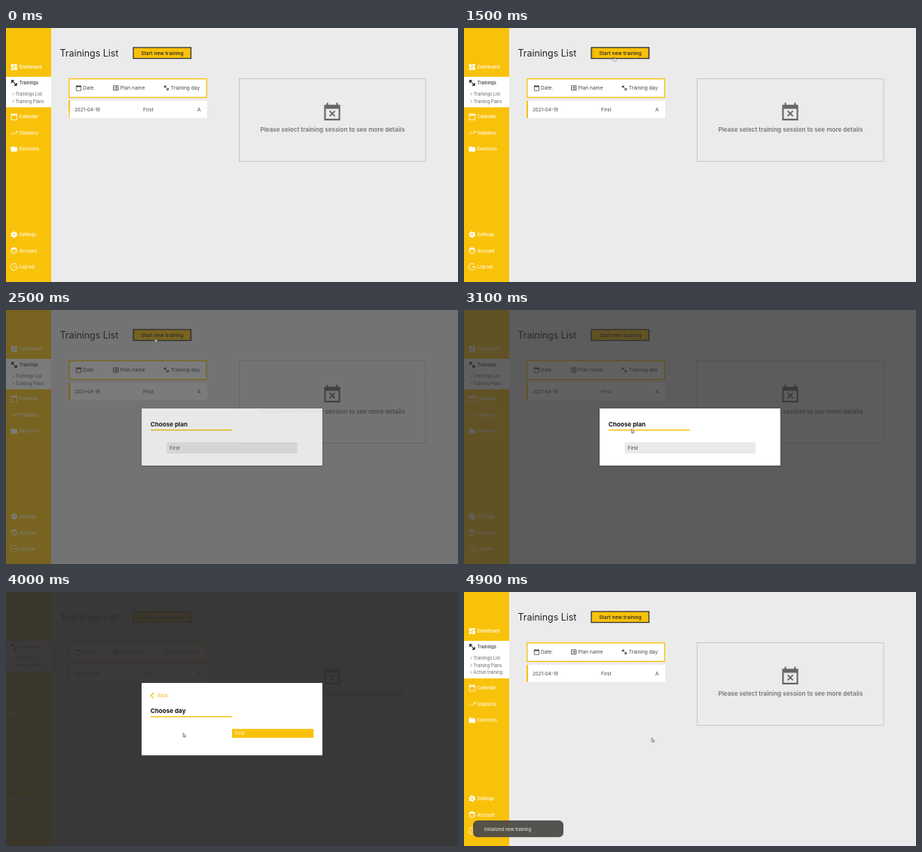
These frames come from a looping animation (600 by 338 pixels, 5000 ms). An HTML page:

```html
<!DOCTYPE html>
<html lang="en">
<head>
<meta charset="utf-8">
<title>Trainings List</title>
<style>
  html, body { margin: 0; width: 100%; height: 100%; overflow: hidden; background: #ecebec; }
  svg { display: block; width: 100vw; height: 100vh; }
  text { font-family: Inter, "Open Sans", sans-serif; font-size: 6.6px; fill: #444; }
  .nav text { font-size: 5.7px; font-weight: 500; fill: #fff; }
  .nav .on text { fill: #333; }
  .nav .sub text { font-weight: 400; fill: #666; }
  .title { font-size: 12.4px; fill: #222; }
  .btn { font-size: 6.7px; font-weight: 500; fill: #222; }
  .head { font-size: 8.1px; font-weight: 700; fill: #111; }
  .line { fill: none; stroke: currentColor; stroke-width: 2; }
  .solid { fill: currentColor; }
  .y { fill: #f9c20a; }

  .a { animation: 5s linear infinite both; }

  .fill { animation-name: fill; transform-origin: 83px 0; }
  @keyframes fill {
    0%, 13% { transform: scaleX(.011); }
    17% { transform: scaleX(.72); }
    18% { transform: scaleX(.489); }
    21%, 100% { transform: scaleX(.011); }
  }
  .gap { animation-name: gap; }
  @keyframes gap {
    0%, 13% { transform: translateX(83px); opacity: 0; }
    13.5% { opacity: 1; }
    17% { transform: translateX(215px); }
    18% { transform: translateX(172.5px); opacity: 1; }
    20.5% { opacity: 1; }
    21%, 100% { transform: translateX(83px); opacity: 0; }
  }
  .row text { animation-name: rowtext; }
  @keyframes rowtext {
    0%, 13% { fill: #444; }
    17% { fill: #bbb; }
    18% { fill: #999; }
    21%, 100% { fill: #444; }
  }

  .hover { animation-name: hover; transform-origin: 207.5px 33px; }
  @keyframes hover {
    0%, 29% { opacity: 0; transform: scaleX(.96); }
    36%, 45.5% { opacity: 1; transform: none; }
    51%, 100% { opacity: 0; transform: scaleX(.96); }
  }

  .dim1 { animation-name: dim1; }
  @keyframes dim1 {
    0%, 45% { opacity: 0; }
    51%, 97.7% { opacity: 1; }
    97.71%, 100% { opacity: 0; }
  }
  .dim2 { animation-name: dim2; }
  @keyframes dim2 {
    0%, 67% { opacity: 0; }
    74%, 93% { opacity: 1; }
    93.01%, 100% { opacity: 0; }
  }
  .plan { animation-name: plan; }
  @keyframes plan {
    0%, 45% { opacity: 0; }
    51%, 67% { opacity: 1; }
    71%, 100% { opacity: 0; }
  }
  .day { animation-name: day; }
  @keyframes day {
    0%, 67% { opacity: 0; }
    72%, 93% { opacity: 1; }
    93.01%, 100% { opacity: 0; }
  }
  .load { animation-name: load; }
  @keyframes load {
    0%, 93% { opacity: 0; }
    93.01%, 97.7% { opacity: 1; }
    97.71%, 100% { opacity: 0; }
  }

  .done { animation-name: done; }
  @keyframes done {
    0%, 97.7% { opacity: 0; }
    97.71%, 100% { opacity: 1; }
  }
  .shift { animation-name: shift; }
  @keyframes shift {
    0%, 97.7% { transform: none; }
    97.71%, 100% { transform: translateY(9.6px); }
  }

  .cursor { animation-name: move; }
  @keyframes move {
    0%, 7.5% { transform: translate(493px, 165px); opacity: 0; }
    7.51%, 8% { transform: translate(493px, 165px); opacity: 1; }
    10% { transform: translate(400px, 149px); }
    12% { transform: translate(298px, 131px); }
    14% { transform: translate(214px, 116px); }
    16% { transform: translate(164px, 103px); }
    18% { transform: translate(134px, 91.5px); }
    20% { transform: translate(137px, 84px); }
    24% { transform: translate(163px, 61px); }
    28% { transform: translate(192px, 41px); }
    30%, 53% { transform: translate(197.5px, 37.8px); }
    57% { transform: translate(206px, 85px); }
    62% { transform: translate(222px, 158px); }
    66% { transform: translate(226px, 182px); }
    74%, 77% { transform: translate(229.5px, 185px); }
    88%, 100% { transform: translate(248.8px, 193.7px); opacity: 1; }
  }
  .arrow { animation-name: arrow; }
  @keyframes arrow {
    0%, 28% { opacity: 1; }
    28.01%, 46% { opacity: 0; }
    46.01%, 65% { opacity: 1; }
    65.01%, 70% { opacity: 0; }
    70.01%, 87% { opacity: 1; }
    87.01%, 97.7% { opacity: 0; }
    97.71%, 100% { opacity: 1; }
  }
  .hand { animation-name: hand; }
  @keyframes hand {
    0%, 28% { opacity: 0; }
    28.01%, 46% { opacity: 1; }
    46.01%, 65% { opacity: 0; }
    65.01%, 70% { opacity: 1; }
    70.01%, 87% { opacity: 0; }
    87.01%, 97.7% { opacity: 1; }
    97.71%, 100% { opacity: 0; }
  }
</style>
</head>
<body>
<svg viewBox="0 0 600 338" preserveAspectRatio="none">
  <defs>
    <symbol id="board" viewBox="0 0 24 24"><path class="solid" d="M3 13h8V3H3zm0 8h8v-6H3zm10 0h8V11h-8zm0-18v6h8V3z"/></symbol>
    <symbol id="bell" viewBox="0 0 24 24">
      <g class="line" transform="rotate(45 12 12)" stroke-width="3"><path d="M0 12h24" stroke-width="2.6"/><path d="M4.5 6v12M19.5 6v12" stroke-width="3.4"/><path d="M1.2 9v6M22.8 9v6" stroke-width="2.4"/></g>
    </symbol>
    <symbol id="cal" viewBox="0 0 24 24"><path class="line" d="M3 4.500h18V22H3z"/><path class="solid" d="M3 4h18v4.500H3zM5 1h2v4H5zM17 1h2v4h-2z"/></symbol>
    <symbol id="trend" viewBox="0 0 24 24"><path class="line" d="M2.500 17.500l7-7 4 4 7-7"/><path class="solid" d="M16 6h6v6z"/></symbol>
    <symbol id="folder" viewBox="0 0 24 24"><path class="solid" d="M4 4h6l2 2h8q2 0 2 2v10q0 2-2 2H4q-2 0-2-2V6q0-2 2-2z"/></symbol>
    <symbol id="list" viewBox="0 0 24 24"><path class="line" d="M3 3.500h18v17H3zM6 8h2M10 8h8M6 12h2M10 12h8M6 16h2M10 16h8"/></symbol>
    <symbol id="gear" viewBox="0 0 24 24"><circle class="line" cx="12" cy="12" r="5.500" style="stroke-width:5"/><circle class="line" cx="12" cy="12" r="9" stroke-dasharray="4.700 4.725" style="stroke-width:3"/></symbol>
    <symbol id="face" viewBox="0 0 24 24"><circle class="line" cx="12" cy="12" r="9"/><path class="solid" d="M3 11q6 0 8-4 4 4 10 3Q19 2 12 2 4 3 3 11z"/><circle class="solid" cx="9" cy="14" r="1.400"/><circle class="solid" cx="15" cy="14" r="1.400"/></symbol>
    <symbol id="exit" viewBox="0 0 24 24"><path class="line" d="M19 5A10 10 0 1 0 22 12H11"/></symbol>
  </defs>

  <rect width="600" height="338" fill="#ecebec"/>

  <g class="nav" color="#fff">
    <rect class="y" width="60" height="338"/>
    <use href="#board" x="5.500" y="46.700" width="10.500" height="10.500"/><text x="17.800" y="54">Dashboard</text>
    <rect y="65" width="60" height="40.500" fill="#fff"/>
    <rect class="a done" y="105" width="60" height="10" fill="#fff"/>
    <g class="on" color="#222"><use href="#bell" x="6" y="68.300" width="9.600" height="9.600"/><text x="17.800" y="75.300">Trainings</text></g>
    <g class="sub" color="#777">
      <path d="M8.800 86.200l1.700 1.700-1.700 1.700M8.800 95.700l1.700 1.700-1.700 1.700" fill="none" stroke="#777" stroke-width=".7"/>
      <text x="12.500" y="90">Trainings List</text><text x="12.500" y="99.500">Training Plans</text>
      <g class="a done"><path d="M8.800 105.200l1.700 1.700-1.700 1.700" fill="none" stroke="#777" stroke-width=".7"/><text x="12.500" y="109">Active training</text></g>
    </g>
    <g class="a shift">
      <use href="#cal" x="5.800" y="113" width="10" height="10"/><text x="17.800" y="120.200">Calendar</text>
      <use href="#trend" x="5.800" y="134.500" width="10.500" height="10.500"/><text x="17.800" y="141.800">Statistics</text>
      <use href="#folder" x="5.600" y="156" width="10.200" height="10.200"/><text x="17.800" y="163.200">Exercises</text>
    </g>
    <use href="#gear" x="5.600" y="269.700" width="10.200" height="10.200"/><text x="17.800" y="277">Settings</text>
    <use href="#face" x="5.400" y="291" width="10.500" height="10.500"/><text x="17.800" y="298.500">Account</text>
    <use href="#exit" x="5.400" y="312.500" width="10.500" height="10.500"/><text x="17.800" y="319.900">Log out</text>
  </g>

  <text class="title" x="71.500" y="38">Trainings List</text>
  <rect class="y" x="169" y="26" width="76.500" height="14.500" stroke="#333" stroke-width="1.300"/>
  <g class="a hover">
    <rect x="166.800" y="25.300" width="81.400" height="16" fill="#333"/>
    <rect class="y" x="170.500" y="26.600" width="74.600" height="13.400"/>
    <path d="M168.700 26.500v13.500M246.700 26.500v13.500" stroke="#a8967a" stroke-width=".8" stroke-dasharray="1 1"/>
  </g>
  <text class="btn" x="207.500" y="35.900" text-anchor="middle">Start new training</text>

  <rect x="83.800" y="67.600" width="182.500" height="24.800" fill="#fff" stroke="#f9c20a" stroke-width="1.400"/>
  <g color="#333">
    <use href="#cal" x="92.200" y="75.600" width="8.400" height="8.400"/><text x="102" y="82.100">Date.</text>
    <use href="#list" x="141.500" y="75.500" width="8.600" height="8.600"/><text x="151.800" y="82.100">Plan name</text>
    <use href="#bell" x="209" y="75.900" width="7.800" height="7.800"/><text x="218.800" y="82.100">Training day</text>
  </g>
  <g class="row">
    <rect x="83" y="96.800" width="184" height="23" fill="#fff"/>
    <rect class="y a fill" x="83" y="96.800" width="184" height="23"/>
    <rect class="a gap" y="96.800" width="1.300" height="23" fill="#ecebec"/>
    <text class="a" x="91" y="110.500" style="font-size:6.200px">2021-04-19</text>
    <text class="a" x="182" y="110.500">First</text>
    <text class="a" x="254" y="110.500">A</text>
  </g>

  <rect x="309.500" y="67.500" width="247.500" height="110" fill="none" stroke="#999" stroke-width=".9" stroke-dasharray="1 1"/>
  <g color="#666">
    <use href="#cal" x="419.500" y="98.500" width="27" height="25.500"/>
    <path class="line" d="M429.600 110.400l7 7M436.600 110.400l-7 7" style="stroke-width:1.900"/>
  </g>
  <text x="433.400" y="138.400" text-anchor="middle" style="font-size:8.100px;font-weight:600;fill:#757575">Please select training session to see more details</text>

  <g class="a done">
    <rect x="12" y="304" width="120" height="22.300" rx="6" fill="#4d4b48" fill-opacity=".95"/>
    <text x="27" y="317.500" style="font-size:5.900px;fill:#eee">Initialized new training</text>
  </g>

  <rect class="a dim1" width="600" height="338" fill="rgba(46,45,45,.75)"/>
  <rect class="a dim2" width="600" height="338" fill="rgba(46,45,45,.75)"/>

  <g class="a plan">
    <rect x="179" y="130.500" width="242" height="78" fill="#000" opacity=".15"/>
    <rect x="180" y="131" width="240" height="76" fill="#fff"/>
    <text class="head" x="191.800" y="155.200">Choose plan</text>
    <rect class="y" x="192" y="159" width="108" height="1.500"/>
    <rect x="213.300" y="176" width="173.500" height="15" fill="#e9e9e9"/>
    <text x="217.300" y="186">First</text>
  </g>

  <g class="a day">
    <rect x="180" y="121" width="240" height="96.300" fill="#fff"/>
    <path d="M196 134l-3.500 3.700 3.500 3.700" fill="none" stroke="#f9c20a" stroke-width="1.300"/>
    <text x="201.300" y="139.800" style="font-size:6px;fill:#f0b90c">Back</text>
    <text class="head" x="191.800" y="161.300">Choose day</text>
    <rect class="y" x="192" y="165.200" width="108" height="1.500"/>
    <rect class="y" x="300" y="182.200" width="108.300" height="11.800"/>
    <text x="304" y="190.200" style="font-size:6.200px;fill:#fff">First</text>
  </g>

  <g class="a load">
    <circle class="y" cx="300" cy="169" r="7.800" fill-opacity=".9"/>
    <g fill="none" stroke="#8a6f1c" stroke-width=".9" stroke-dasharray="1 1.300">
      <circle cx="300" cy="169" r="6.200"/><circle cx="300" cy="169" r="4"/><circle cx="300" cy="169" r="1.800"/>
    </g>
  </g>

  <g class="a cursor">
    <path class="a arrow" d="M.3.200v5.200l1.200-1 .9 1.900.9-.4-.8-1.800h1.600z" fill="#fff" stroke="#333" stroke-width=".6"/>
    <path class="a hand" d="M1.200.600q.6-.7 1 .1v2l2.200.5q.6.200.4 1l-.5 2.200H1.700L-.2 4q.3-.8 1.400 0z" fill="#fff" stroke="#333" stroke-width=".5"/>
  </g>
</svg>
</body>
</html>
```
